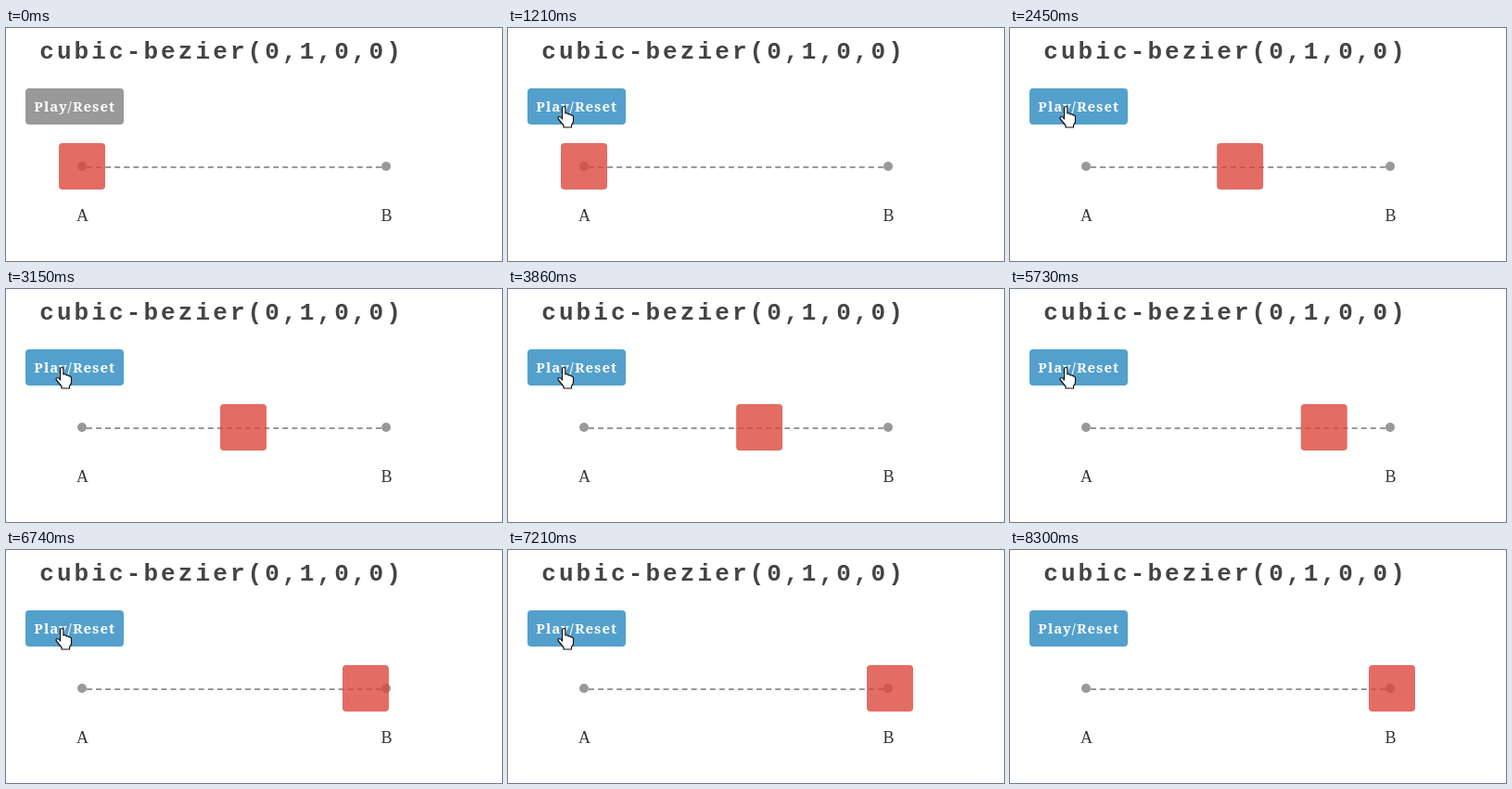
Write an HTML page that moves like this. It is 535x251 px and loops after 9.78 s.

```html
<!DOCTYPE html>
<html lang="en">
<head>
<meta charset="utf-8">
<title>cubic-bezier</title>
<style>
  html, body { margin: 0; width: 100%; height: 100%; overflow: hidden; background: #fff; }
  svg { display: block; }
  .title { font: bold 26px "Liberation Mono", "Courier New", monospace; letter-spacing: 3.1px; fill: #444; }
  .label { font: 18px "Liberation Serif", serif; text-anchor: middle; fill: #333; }
  .button { font: 600 15px "Noto Serif", serif; letter-spacing: 1px; text-anchor: middle; fill: #fff; }
  .cursor { fill: #fff; stroke: #111; stroke-width: 1.2; stroke-linejoin: round; }
</style>
</head>
<body>
<svg width="535" height="251" viewBox="0 0 535 251">
  <text class="title" x="36.2" y="33">cubic-bezier(0,1,0,0)</text>
  <rect id="button" x="21" y="65" width="106" height="39" rx="4"/>
  <text class="button" x="74.200" y="90">Play/Reset</text>
  <g fill="#999">
    <path d="M87 150H405" stroke="#999" stroke-width="2" stroke-dasharray="6 4.06"/>
    <circle cx="82" cy="149" r="5"/>
    <circle cx="410" cy="149" r="5"/>
  </g>
  <text class="label" x="82.5" y="208">A</text>
  <text class="label" x="410.5" y="208">B</text>
  <rect id="box" y="124" width="50" height="50" rx="4" fill="#dc483e" fill-opacity=".8"/>
  <path id="hand" class="cursor" d="M-1.500 13V2.200a1.700 1.700 0 0 1 3.400 0V8q3-.8 3.200 1 2.600-.6 2.900 1 2.500-.3 2.500 2V16q0 3-2 4.500V23H0V21L-5.700 14q-1-2 1-2.500 1.500 0 3.200 2.500z"/>
  <path id="arrow" class="cursor" d="M0 0V16l3.700-3.500 2.400 5.700 2.500-1-2.400-5.600h5z"/>
</svg>
<script>
const LOOP = 9780, STEP = 77.9, DURATION = 6000, CLICK_STEP = 14;
const [button, box, hand, arrow] = ["button", "box", "hand", "arrow"].map(id => document.getElementById(id));
const clamp = v => Math.min(1, Math.max(0, v));
const mix = (a, b, u) => a + (b - a) * u;

// cubic-bezier(0,1,0,0): time is s³, so the curve solves directly
function ease(p) {
  const s = Math.cbrt(p);
  return 3 * s * (1 - s) ** 2 + s ** 3;
}

function cursorAt(t, step) {
  if (step < 0 || t >= 7980) return null;
  if (t >= 7900) return [70, 235];
  if (t >= 7820) return [63, 130];
  const rest = (1 - clamp(step / 9)) ** 3;
  return [60 + 60 * rest, 84 + 135 * rest];
}

function draw(t) {
  // The motion advances in discrete steps
  const step = Math.floor((t - 112) / STEP);
  const elapsed = step > CLICK_STEP ? (step - CLICK_STEP) * STEP + 20 : 0;
  box.setAttribute("x", 57 + 330 * ease(clamp(elapsed / DURATION)));

  const hover = clamp((step - 5) / 4);
  const color = [84, 160, 205].map(c => Math.round(mix(153, c, hover)));
  button.setAttribute("fill", `rgb(${color})`);

  const cursor = cursorAt(t, step);
  const overButton = cursor && cursor[1] <= 104;
  hand.style.display = overButton ? "" : "none";
  arrow.style.display = cursor && !overButton ? "" : "none";
  if (cursor) (overButton ? hand : arrow).setAttribute("transform", `translate(${cursor})`);
}

const start = performance.now();
function tick() {
  draw((performance.now() - start) % LOOP);
  requestAnimationFrame(tick);
}
tick();
</script>
</body>
</html>
```
